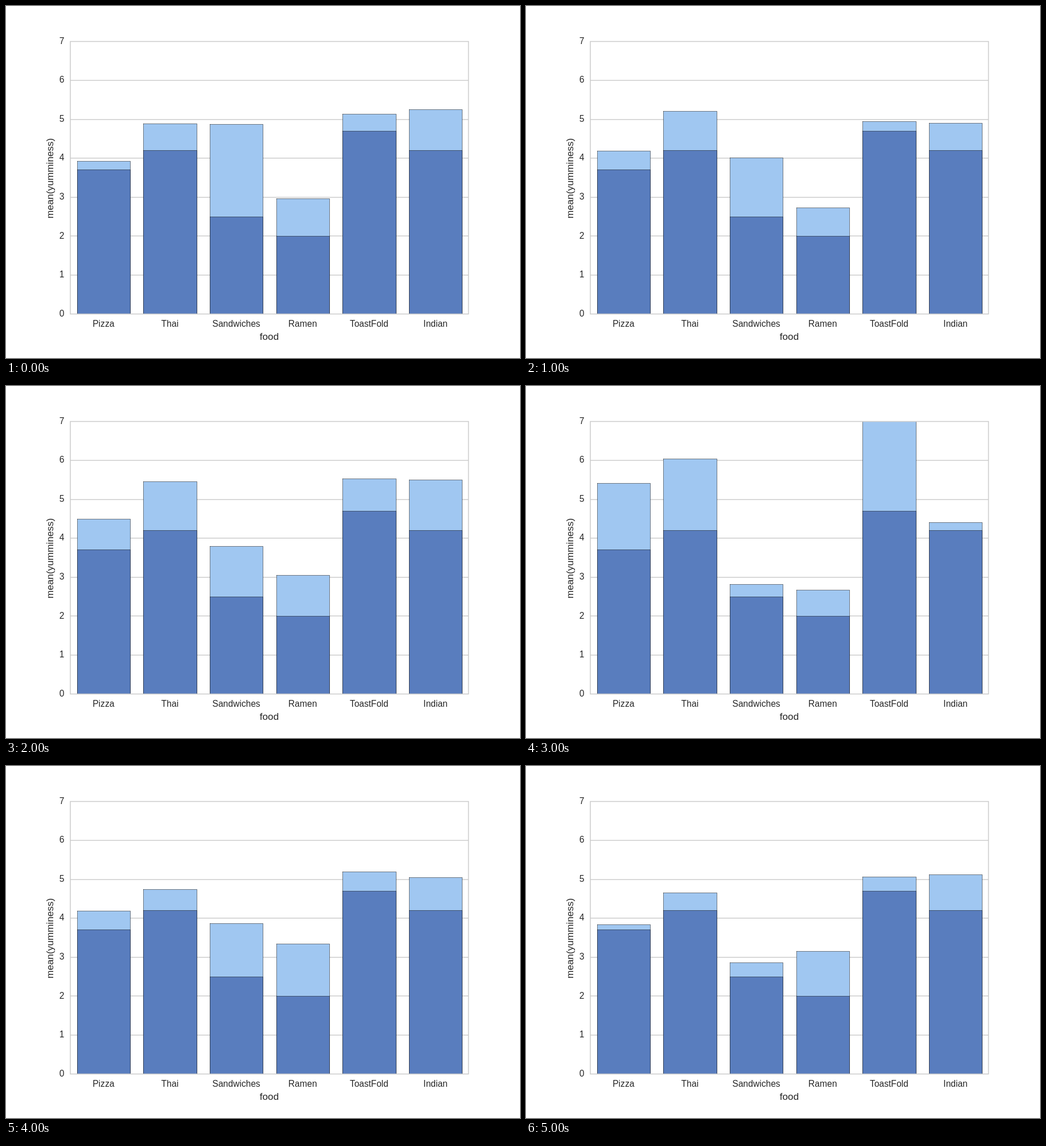
Animation, 903 px wide and 620 px high, one loop 6000 ms. Source, as an HTML page:

```html
<!DOCTYPE html>
<html lang="en">
<head>
<meta charset="utf-8">
<title>Mean yumminess by food</title>
<style>
  html, body { margin: 0; width: 100%; height: 100%; overflow: hidden; background: #fff; }
  svg { display: block; width: 903px; height: 620px; }
  text { font: 15.6px "Liberation Sans", Arial, sans-serif; fill: #262626; text-anchor: middle; }
  .tick { text-anchor: end; }
  .title { font-size: 17.2px; }
  .grid, .frame { fill: none; stroke: #ccc; stroke-width: 1.56; }
  .bar { stroke: #000; stroke-width: .47; }
  .light { fill: #a0c7f1; }
  .dark { fill: #597dbe; }
  .step {
    visibility: hidden;
    animation: show 6s step-end infinite;
    animation-delay: calc((var(--i) - 6) * 1s);
  }
  @keyframes show {
    0% { visibility: visible; }
    16.666%, 100% { visibility: hidden; }
  }
</style>
</head>
<body>
<svg viewBox="0 0 903 620">
  <clipPath id="plot"><rect x="113" y="63" width="700" height="480"/></clipPath>
  <g id="grid"></g>
  <g id="bars" clip-path="url(#plot)"></g>
  <rect class="frame" x="113" y="62.5" width="699.5" height="480"/>
  <g id="labels"></g>
  <text class="title" x="462.5" y="588">food</text>
  <text class="title" transform="translate(83 303.5) rotate(-90)">mean(yumminess)</text>
</svg>
<script>
const foods = ["Pizza", "Thai", "Sandwiches", "Ramen", "ToastFold", "Indian"];
const baseTops = [288, 254, 371, 405, 220, 254];
// Top edge of each light bar, one row per second
const stepTops = [
  [273, 207, 208, 339, 190, 182],
  [255, 185, 267, 355, 203, 206],
  [234, 168, 282, 333, 163, 165],
  [171, 128, 349, 359,  40, 240],
  [255, 217, 277, 313, 186, 196],
  [279, 223, 346, 326, 195, 191],
];
const bottom = 542.5, unit = 68.6, slot = 116.65;

function add(parent, tag, attrs, text = "") {
  const node = document.createElementNS("http://www.w3.org/2000/svg", tag);
  for (const name in attrs) node.setAttribute(name, attrs[name]);
  node.textContent = text;
  return parent.appendChild(node);
}

function addBars(parent, tops, shade) {
  tops.forEach((top, i) => {
    const x = Math.round(124.6 + slot * i) + .5;
    const right = Math.round(218.1 + slot * i) + .5;
    add(parent, "rect", {
      class: `bar ${shade}`, x, y: top + .5, width: right - x, height: bottom - top - .5,
    });
  });
}

const [grid, bars, labels] = ["grid", "bars", "labels"].map(id => document.getElementById(id));

for (let value = 0; value <= 7; value++) {
  const y = bottom - value * unit;
  if (value % 7) add(grid, "path", { class: "grid", d: `M113 ${Math.round(y)}H812.5` });
  add(labels, "text", { class: "tick", x: 102.5, y: Math.round(y + 4.2) }, value);
}

foods.forEach((food, i) =>
  add(labels, "text", { x: 171.3 + slot * i, y: 565 }, food));

stepTops.forEach((tops, i) =>
  addBars(add(bars, "g", { class: "step", style: `--i:${i}` }), tops, "light"));
addBars(bars, baseTops, "dark");
</script>
</body>
</html>
```
